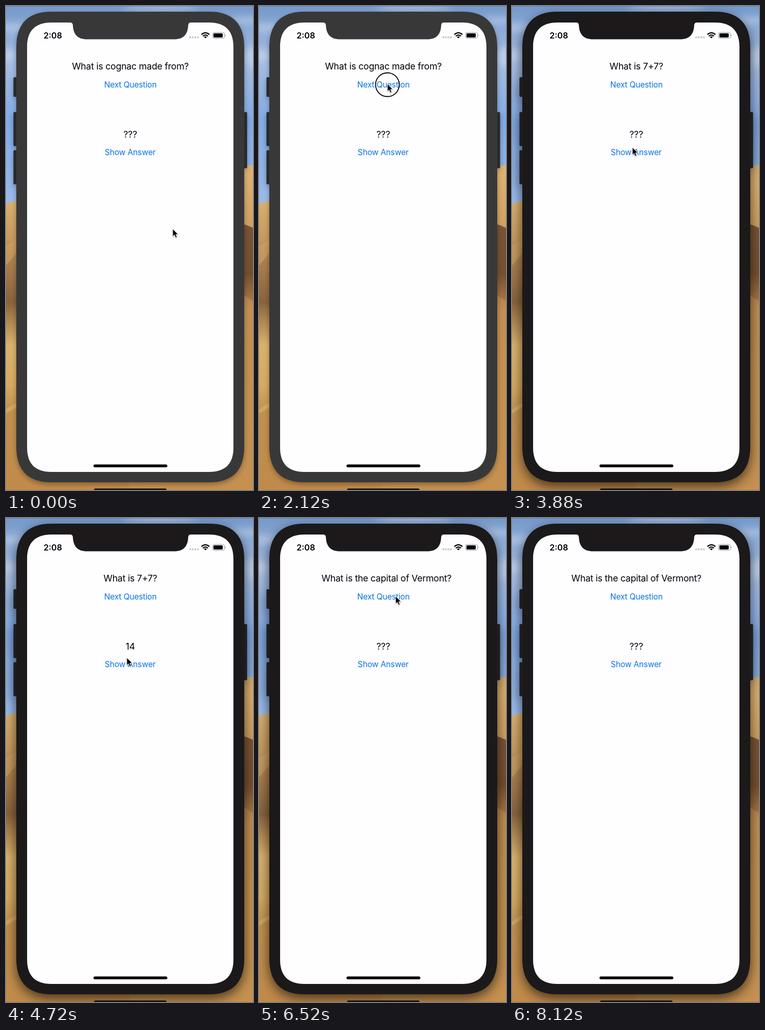
Write an HTML page that moves like this. It is 480x938 px and loops after 8160 ms.

```html
<!DOCTYPE html>
<html lang="en">
<head>
<meta charset="utf-8">
<title>Quiz</title>
<style>
html, body { margin: 0; width: 100%; height: 100%; overflow: hidden; background: #8aa9d6; }
svg { display: block; width: 480px; height: 938px; }
text { font-family: Inter, sans-serif; letter-spacing: -.013em; text-anchor: middle; }
.label { font-size: 17.6px; fill: #000; }
.button { font-size: 15.6px; fill: #0a75e0; }
#clock { font-size: 16px; font-weight: 600; letter-spacing: 0; text-anchor: start; }
#phone { fill: #393839; filter: drop-shadow(0 4px 5px rgba(0,0,0,.32)); }
#phone .key { fill: #29292b; }
.active #phone { fill: #1b191a; filter: drop-shadow(0 8px 11px rgba(0,0,0,.62)); }
.active #phone .key { fill: #1e1d1f; }
#cursor { filter: drop-shadow(0 1px 1px rgba(0,0,0,.35)); }
</style>
</head>
<body>
<svg id="stage" viewBox="0 0 480 938">
  <defs>
    <linearGradient id="sky" x2="0" y2="1">
      <stop offset="0" stop-color="#7599ca"/>
      <stop offset=".12" stop-color="#8eacd9"/>
      <stop offset=".3" stop-color="#a2bbe0"/>
      <stop offset=".55" stop-color="#83abe6"/>
      <stop offset="1" stop-color="#9cbcea"/>
    </linearGradient>
    <linearGradient id="left" gradientUnits="userSpaceOnUse" x1="0" y1="378" x2="0" y2="938">
      <stop offset="0" stop-color="#d9b070"/>
      <stop offset=".13" stop-color="#c69a5e"/>
      <stop offset=".18" stop-color="#b38650"/>
      <stop offset=".35" stop-color="#87633e"/>
      <stop offset=".4" stop-color="#a77f4b"/>
      <stop offset=".5" stop-color="#dab26d"/>
      <stop offset=".64" stop-color="#d5aa62"/>
      <stop offset=".73" stop-color="#c0904e"/>
      <stop offset="1" stop-color="#c08a4b"/>
    </linearGradient>
    <linearGradient id="right" gradientUnits="userSpaceOnUse" x1="0" y1="306" x2="0" y2="938">
      <stop offset="0" stop-color="#dfb675"/>
      <stop offset=".18" stop-color="#d0a163"/>
      <stop offset=".35" stop-color="#a87746"/>
      <stop offset=".45" stop-color="#c18e53"/>
      <stop offset=".7" stop-color="#c3914f"/>
      <stop offset="1" stop-color="#c59050"/>
    </linearGradient>
    <linearGradient id="shade" x2="0" y2="1">
      <stop offset="0" stop-color="#795336"/>
      <stop offset=".65" stop-color="#75502f"/>
      <stop offset="1" stop-color="#a87746"/>
    </linearGradient>
    <filter id="soft" x="-50%" y="-100%" width="200%" height="300%"><feGaussianBlur stdDeviation="7"/></filter>
  </defs>

  <rect width="480" height="400" fill="url(#sky)"/>
  <g fill="#d3def0" opacity=".55" filter="url(#soft)">
    <ellipse cx="20" cy="42" rx="45" ry="7"/>
    <ellipse cx="2" cy="96" rx="20" ry="13"/>
    <ellipse cx="465" cy="28" rx="36" ry="6"/>
    <ellipse cx="480" cy="98" rx="18" ry="20"/>
    <ellipse cx="300" cy="3" rx="75" ry="6"/>
  </g>
  <path d="M240 400V340L463 315Q470 308 480 308V938H240Z" fill="url(#right)"/>
  <path d="M455 421Q468 424 480 430V572L455 556Z" fill="url(#shade)"/>
  <path d="M0 384Q10 378 40 374L240 420V938H0Z" fill="url(#left)"/>
  <path d="M0 464Q12 460 24 448V474L0 503Z" fill="#d1a76a" opacity=".55"/>
  <path d="M0 782Q10 774 24 767V775L0 790Z" fill="#e0b970" opacity=".5"/>
  <rect width="480" height="1" fill="#424a59" opacity=".35"/>
  <rect x="171" y="935" width="141" height="8" rx="3" fill="#1c1b1c"/>

  <g id="phone">
    <g class="key">
      <rect x="14.5" y="138" width="9" height="38" rx="2"/>
      <rect x="14.5" y="205.500" width="9" height="66" rx="2"/>
      <rect x="14.5" y="279.500" width="9" height="66" rx="2"/>
      <rect x="459" y="205.500" width="9.500" height="109" rx="2"/>
    </g>
    <path d="M88 11H395C441 11 463 35 463 80V854C463 899 441 923 395 923H88C42 923 20 899 20 854V80C20 35 42 11 88 11Z"/>
  </g>
  <path fill="#fefdff" d="M88 32H125Q130 32 130 38C131 56 140 64.500 157 64.500H327C344 64.500 353 56 354 38Q354 32 359 32H395C426 32 442 48 442 79V856C442 887 426 903 395 903H88C57 903 41 887 41 856V79C41 48 57 32 88 32Z"/>

  <text id="clock" x="73" y="62.700">2:08</text>
  <g fill="#c5c4c7">
    <circle cx="358" cy="60.700" r="1.900"/><circle cx="363" cy="60.700" r="1.900"/>
    <circle cx="368" cy="60.700" r="1.900"/><circle cx="373" cy="60.700" r="1.900"/>
  </g>
  <g fill="none" stroke="#000" stroke-width="2.300">
    <path d="M379.800 55.300Q387.500 48.500 395.200 55.300"/>
    <path d="M382.500 58.300Q387.500 53.900 392.500 58.300"/>
    <path d="M384.700 59.900Q387.500 57.700 390.300 59.900L387.500 62.700Z" fill="#000" stroke="none"/>
  </g>
  <rect x="401.500" y="51.300" width="23" height="11.400" rx="3.200" fill="none" stroke="#929193"/>
  <rect x="403.200" y="53" width="18" height="8" rx="1.800"/>
  <path d="M426 55.200Q428.200 57 426 58.800Z" fill="#929193"/>

  <text class="label" id="first" y="122.500">What is cognac made from?</text>
  <text class="label" id="second" y="122.500">What is 7+7?</text>
  <text class="label" id="third" y="122.500">What is the capital of Vermont?</text>
  <text class="button" x="241.700" y="158">Next Question</text>
  <text class="label" id="answer" x="241.500" y="254.500">???</text>
  <text class="button" x="241.300" y="289.200">Show Answer</text>
  <rect x="170" y="888.500" width="143.500" height="5.500" rx="2.750"/>

  <circle id="press" r="23" fill="none" stroke="#000" stroke-width="1.800"/>
  <path id="cursor" d="M0 0V14.600L3.300 11.600L5.700 17L8.300 15.900L6 10.700H10.500Z" stroke="#fff" stroke-width=".9"/>
</svg>
<script>
const LOOP = 8160, CENTER = 241.7, WIDTH = 402;
const SWAPS = [2160, 5760];
const ANSWER_AT = 4200;
const PRESSES = [[2040, 2160], [4080, 4200], [5640, 5760]];
// Cursor stops: arrival time, departure time, x, y
const STOPS = [
  [0, 640, 324, 432],
  [1640, 2960, 249.5, 151],
  [3800, 4640, 234, 274],
  [5480, 6840, 265.5, 151.5],
  [7520, LOOP, 335, -30]
];
const el = id => document.getElementById(id);
const clamp = v => Math.max(0, Math.min(1, v));
const ease = p => p * p * (3 - 2 * p);

// Underdamped spring, falling from 1 to 0
function spring(ms) {
  if (ms <= 0) return 1;
  const u = ms * .007;
  return Math.exp(-.8 * u) * (Math.cos(.6 * u) + .8 / .6 * Math.sin(.6 * u));
}

function cursorAt(t) {
  const i = STOPS.findLastIndex(s => t >= s[0]);
  const [, leave, x, y] = STOPS[i];
  const next = STOPS[i + 1];
  if (!next || t < leave) return [x, y];
  const p = ease((t - leave) / (next[0] - leave));
  return [x + (next[2] - x) * p, y + (next[3] - y) * p];
}

function draw(now) {
  const t = now % LOOP;
  const shown = SWAPS.map(s => clamp((t - s) / 500));
  const alpha = [1 - shown[0], shown[0] * (1 - shown[1]), shown[1]];
  ["first", "second", "third"].forEach((id, i) => {
    const shift = i ? WIDTH * spring(t - SWAPS[i - 1]) : 0;
    el(id).setAttribute("x", CENTER - shift);
    el(id).setAttribute("opacity", alpha[i]);
  });
  el("answer").textContent = t >= ANSWER_AT && t < SWAPS[1] ? "14" : "???";
  el("stage").classList.toggle("active", t >= SWAPS[0]);

  const [x, y] = cursorAt(t);
  el("cursor").setAttribute("transform", `translate(${x} ${y})`);
  el("press").setAttribute("transform", `translate(${x} ${y + 1.5})`);
  el("press").style.display = PRESSES.some(([a, b]) => t >= a && t < b) ? "" : "none";
}

const start = performance.now();
function tick() {
  draw(performance.now() - start);
  requestAnimationFrame(tick);
}
tick();
</script>
</body>
</html>
```
